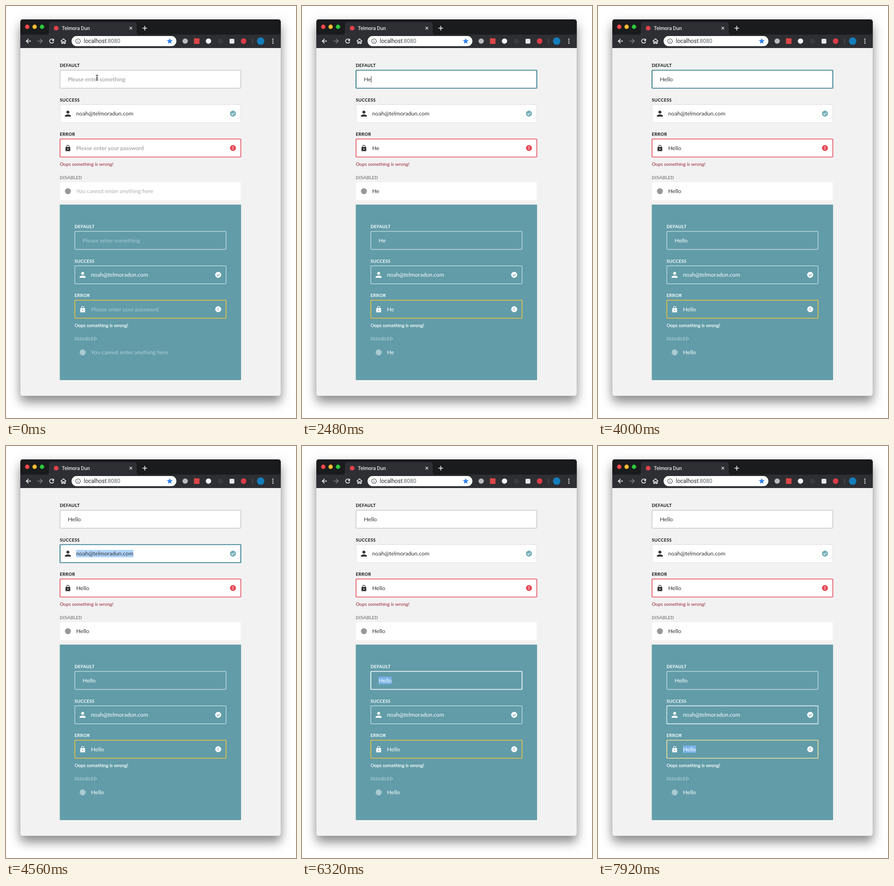
Write an HTML page that moves like this. It is 628 by 892 pixels and loops after 8000 ms.

```html
<!DOCTYPE html>
<html lang="en">
<head>
<meta charset="utf-8">
<title>Form fields</title>
<style>
  html, body { margin: 0; width: 100%; height: 100%; overflow: hidden; background: #fff; }
  #window {
    position: absolute; left: 31px; top: 29px; width: 564px; height: 815px; border-radius: 5px;
    box-shadow: 0 0 1px rgba(0,0,0,.6), 0 14px 22px rgba(0,0,0,.42), 0 0 32px rgba(0,0,0,.07);
  }
  svg { position: absolute; left: 0; top: 0; display: block; }
  text { font-family: Lato, sans-serif; white-space: pre; }
  .value { font-size: 12.2px; }
  .label { font-size: 9.6px; font-weight: 700; letter-spacing: .3px; }
  .message { font-size: 10.2px; }
  .tab { font: 500 10px Inter, sans-serif; fill: #fff; }
  .url { font: 12px Roboto, sans-serif; fill: #202124; }
  .line { fill: none; stroke: #fff; stroke-width: 1.5; }
</style>
</head>
<body>
<div id="window"></div>
<svg width="628" height="892" viewBox="0 0 628 892">
  <defs>
    <clipPath id="frame"><rect x="31" y="29" width="564" height="815" rx="5"/></clipPath>
    <path id="person" transform="scale(.82) translate(-12 -12)" d="M12 12c2.2 0 4-1.8 4-4s-1.8-4-4-4-4 1.8-4 4 1.8 4 4 4zm0 2c-2.7 0-8 1.3-8 4v2h16v-2c0-2.7-5.3-4-8-4z"/>
    <path id="lock" transform="scale(.65) translate(-12 -11.5)" d="M18 8h-1V6c0-2.8-2.2-5-5-5S7 3.2 7 6v2H6c-1.1 0-2 .9-2 2v10c0 1.1.9 2 2 2h12c1.1 0 2-.9 2-2V10c0-1.1-.9-2-2-2zm-6 9c-1.1 0-2-.9-2-2s.9-2 2-2 2 .9 2 2-.9 2-2 2zm3.1-9H8.9V6c0-1.7 1.4-3.1 3.1-3.1s3.1 1.4 3.1 3.1v2z"/>
    <circle id="dot" r="6.5"/>
  </defs>
  <g clip-path="url(#frame)">
    <path fill="#f2f2f2" d="M31 29h564v815H31z"/>
    <path fill="#1a1b1d" d="M31 29h564v34H31z"/>
    <path fill="#2e2f33" d="M31 62H87Q93 62 93 56V41Q93 35 99 35H277Q283 35 283 41V56Q283 62 289 62H595V91H31z"/>
  </g>
  <circle cx="46" cy="45" r="4.7" fill="#fb4948"/>
  <circle cx="62" cy="45" r="4.7" fill="#fdbd2e"/>
  <circle cx="78" cy="45" r="4.7" fill="#29c940"/>
  <circle cx="108.5" cy="48" r="5" fill="#e5434f"/>
  <text class="tab" x="121" y="51.7">Telmora Dun</text>
  <path class="line" style="stroke-width:1.1" d="M267.5 45.2l5.6 5.6m0-5.6l-5.6 5.6"/>
  <path class="line" d="M295.5 48h10m-5-5v10"/>
  <path class="line" d="M54 76H44m4.8-4.8L44 76l4.8 4.8"/>
  <path class="line" style="stroke:#85868a" d="M68.500 76h10m-4.800-4.800l4.800 4.800l-4.800 4.800"/>
  <path class="line" d="M102.500 73A4.500 4.500 0 1 0 103.300 77.200"/>
  <path fill="#fff" d="M104 70.500v5h-5z"/>
  <path class="line" d="M118.500 76.500l6-5.500l6 5.500M120.700 75.500v5.500h2.500v-3.500h2.600v3.500h2.500v-5.500"/>
  <rect x="142" y="65" width="227" height="22" rx="11" fill="#fff"/>
  <g fill="none" stroke="#55585c" stroke-width="1.2"><circle cx="156" cy="76" r="5"/><path d="M156 75.200v3.500m0-5.900v1.300"/></g>
  <text class="url" x="168.500" y="80">localhost<tspan fill="#5f6368">:8080</tspan></text>
  <path fill="#2c82ee" d="M354.500 69.500l1.800 4.200 4.600.4-3.500 3 1.100 4.500-4-2.400-4 2.400 1.100-4.500-3.500-3 4.600-.4z"/>
  <circle cx="388" cy="76" r="5.800" fill="#b9babd"/>
  <rect x="407" y="70" width="12" height="12" fill="#dd4346"/>
  <circle cx="438.500" cy="76" r="5.800" fill="#f4f4f4"/>
  <circle cx="464" cy="76" r="5.500" fill="#3b3c40"/>
  <rect x="484" y="71" width="10.500" height="10.500" rx="2" fill="#e6e6e8"/>
  <circle cx="514.500" cy="76" r="6" fill="#dc3d48"/>
  <path stroke="#606166" d="M534 70v13"/>
  <circle cx="551.500" cy="76" r="8" fill="#147fbd"/>
  <g fill="#fff"><circle cx="578" cy="71.700" r="1.300"/><circle cx="578" cy="76" r="1.300"/><circle cx="578" cy="80.300" r="1.300"/></g>
  <rect x="116.500" y="430" width="392.500" height="380" fill="#619ca8"/>
  <g id="form"></g>
  <path id="caret" stroke="#333" d="M.500 151.500v14"/>
  <g id="pointer" fill="none" stroke-linecap="round">
    <path id="beam" stroke="#fff" stroke-width="2.600" d="M194.800 149.500q2.200 0 2.200 1.500q0-1.500 2.200-1.500M197 151v8M194.800 160.500q2.200 0 2.200-1.500q0 1.500 2.200 1.500M195.500 156h3"/>
    <use href="#beam" style="stroke:#111"/>
    <path stroke="#111" stroke-width="1.100" d="M194.800 149.500q2.200 0 2.200 1.500q0-1.500 2.200-1.500M197 151v8M194.800 160.500q2.200 0 2.200-1.500q0 1.500 2.200 1.500M195.500 156h3"/>
  </g>
</svg>
<script>
const LOOP = 8000, FADE = 200;
const EMAIL = 'noah@telmoradun.com', TYPED = 'Hello';
const keyTimes = [2160, 2400, 2640, 2800, 3160];
const byId = id => document.getElementById(id);
const form = byId('form'), caret = byId('caret'), pointer = byId('pointer');

const light = {
  x: 116.5, right: 509, dy: 0, ink: '#333', label: '#111', dimLabel: '#858585', icon: '#333', logo: '#999',
  hint: '#919191', dimHint: '#adadad', fill: '#fff', ok: '#75adb7', bad: '#e64b59', mark: '#fff', message: '#96222f',
  focus: [29, 111, 131], select: '#aed3fb',
  borders: [[176, 176, 176], [221, 221, 221], [227, 74, 88], [230, 230, 230]],
  focusTimes: [430, 4200, 5140]
};
const reverse = {
  x: 148.5, right: 477, dy: 349, ink: '#fff', label: '#fff', dimLabel: '#abcbd1', icon: '#fff', logo: '#abcbd1',
  hint: '#a9cad0', dimHint: '#b3d0d5', fill: 'none', ok: '#fff', bad: '#fff', mark: '#619ca8', message: '#fff',
  focus: [255, 255, 255], select: '#7ab3ea',
  borders: [[236, 243, 244], [236, 243, 244], [242, 195, 60], [163, 199, 206]],
  focusTimes: [5980, 6840, 7820]
};
const kinds = [
  { label: 'DEFAULT', y: 138.5, hint: 'Please enter something' },
  { label: 'SUCCESS', y: 213, value: EMAIL, icon: 'person' },
  { label: 'ERROR', y: 287.5, hint: 'Please enter your password', icon: 'lock' },
  { label: 'DISABLED', y: 381, hint: 'You cannot enter anything here', icon: 'dot' }
];

function addField(theme, kind, i) {
  const { x, right } = theme, y = kind.y + theme.dy, mid = y + 20, disabled = i === 3;
  const textX = x + (i ? 35.5 : 17.5);
  const g = document.createElementNS('http://www.w3.org/2000/svg', 'g');
  let html = `<text class="label" x="${x}" y="${y - 6.5}" fill="${disabled ? theme.dimLabel : theme.label}">${kind.label}</text>
    <rect class="box" x="${x + .5}" y="${y + .5}" width="${right - x - 1}" height="39" rx="1" fill="${theme.fill}"/>
    <rect class="selection" x="${textX}" y="${mid - 8}" height="16" fill="${theme.select}"/>
    <text class="value" x="${textX}" y="${mid + 4}"></text>`;
  if (i) html += `<use href="#${kind.icon}" x="${x + 17.5}" y="${mid}" fill="${disabled ? theme.logo : theme.icon}"/>`;
  if (i === 1 || i === 2) {
    const d = i === 1 ? 'M-3.2 .2l2.200 2.200l4.300-4.500' : 'M0-3.600v4.300m0 1.300v1.500';
    html += `<g transform="translate(${right - 17.5} ${mid})"><use href="#dot" fill="${i === 1 ? theme.ok : theme.bad}"/>
      <path d="${d}" fill="none" stroke="${theme.mark}" stroke-width="1.400"/></g>`;
  }
  if (i === 2) html += `<text class="message" x="${x}" y="${y + 58.5}" fill="${theme.message}"
      ${theme === reverse ? 'stroke="#fff" stroke-width=".250"' : ''}>Oops something is wrong!</text>`;
  g.innerHTML = html;
  form.append(g);
  const [box, selection, value] = ['box', 'selection', 'value'].map(c => g.querySelector('.' + c));
  return { theme, kind, i, box, selection, value, disabled, textX, start: theme.focusTimes[i] ?? Infinity };
}

const fields = [light, reverse].flatMap(theme => kinds.map((kind, i) => addField(theme, kind, i)));
const focusOrder = fields.filter(f => !f.disabled);
focusOrder.forEach((f, n) => f.end = focusOrder[n + 1]?.start ?? Infinity);

const ease = k => { k = Math.min(1, Math.max(0, k)); return k * k * (3 - 2 * k); };

function draw(t) {
  const count = keyTimes.filter(k => k <= t).length, typed = TYPED.slice(0, count);
  for (const f of fields) {
    const { theme, kind, i } = f;
    const focused = t >= f.start && t < f.end;
    const text = kind.value || typed;
    const level = ease((t - f.start) / FADE) - ease((t - f.end) / FADE);
    const color = theme.borders[i].map((c, n) => c + (theme.focus[n] - c) * level);
    const base = i === 2 ? 1.6 : 1;
    f.box.setAttribute('stroke', `rgb(${color})`);
    f.box.setAttribute('stroke-width', base + (1.7 - base) * level);
    f.value.textContent = text || (focused ? '' : kind.hint);
    f.value.setAttribute('fill', text ? theme.ink : f.disabled ? theme.dimHint : theme.hint);
    const selected = focused && f !== fields[0];
    f.selection.setAttribute('width', selected ? f.value.getComputedTextLength() : 0);
  }
  const first = fields[0], lastInput = count ? keyTimes[count - 1] : first.start;
  const caretOn = t >= first.start && t < first.end && (t - lastInput) % 1000 < 500;
  caret.style.display = caretOn ? '' : 'none';
  if (caretOn) caret.setAttribute('transform', `translate(${first.textX + first.value.getComputedTextLength()} 0)`);
  pointer.style.display = count ? 'none' : '';
}

function tick() {
  draw(performance.now() % LOOP);
  requestAnimationFrame(tick);
}
tick();
</script>
</body>
</html>
```
